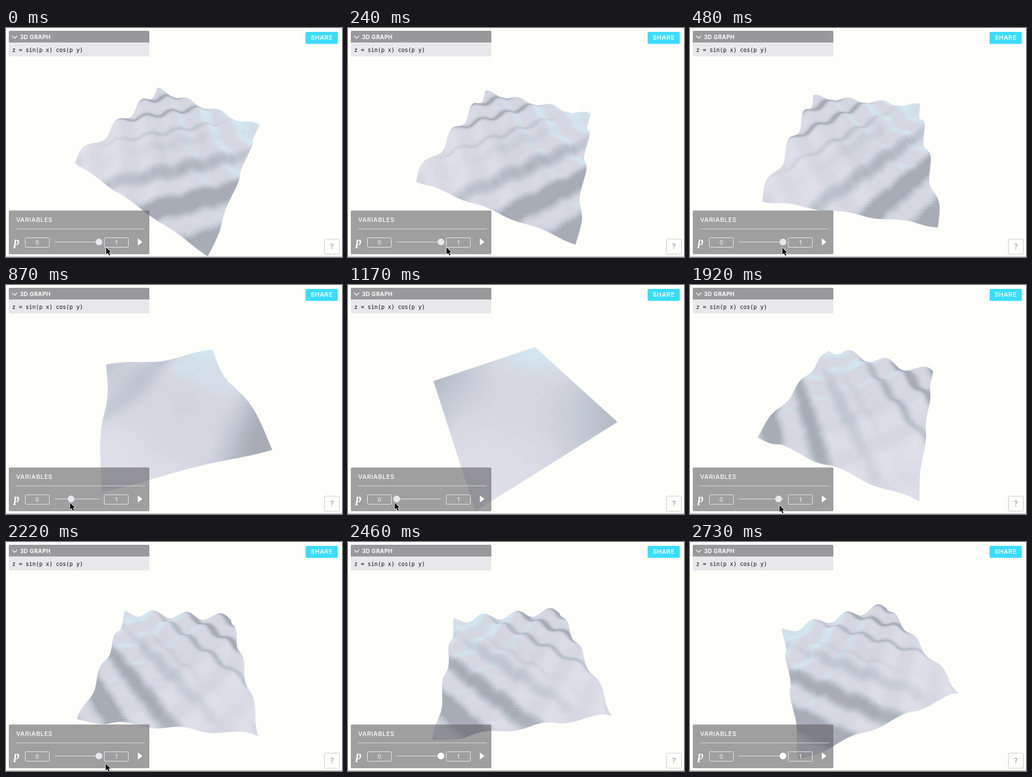
Recreate the animation shown at these times as an HTML page with a canvas. Size 600 by 411 pixels, loop 2.76 s.

```html
<!DOCTYPE html>
<html lang="en">
<head>
<meta charset="utf-8">
<title>3D graph</title>
<style>
  html, body { margin: 0; width: 100%; height: 100%; overflow: hidden; background: #fefefb; }
  canvas { display: block; width: 600px; height: 411px; }
</style>
</head>
<body>
<canvas id="stage" width="600" height="411"></canvas>
<script>
const W = 600, H = 411, LOOP = 2760, STEP = 30;
const canvas = document.getElementById('stage');
const dpr = window.devicePixelRatio || 1;
canvas.width = W * dpr;
canvas.height = H * dpr;
const ctx = canvas.getContext('2d');
ctx.scale(dpr, dpr);

const BACK = '#fefefb', PALE = '#e8e8ea', WHITE = '#fdfdfd';
const SANS = 'Inter, Roboto, sans-serif';
const clamp = (v, a, b) => Math.min(b, Math.max(a, v));
const ramp = (a, b, v) => clamp((v - a) / (b - a), 0, 1);
const mix = (a, b, k) => a.map((v, i) => v + (b[i] - v) * k);

// Pointer path: time, x, y
const PATH = [
  [0, 179, 394], [240, 176, 394], [480, 165, 394.5], [870, 114.5, 391],
  [1230, 82.7, 391], [1650, 126, 394], [1980, 166, 396],
  [2220, 178, 398], [2460, 182, 418]
];
// Turn of the surface: time, degrees
const TURN = [[0, 58.4], [480, 82.2], [2220, 175.6], [2730, 201.2]];

function slope(keys, i, c) {
  const a = keys[Math.max(i - 1, 0)], b = keys[Math.min(i + 1, keys.length - 1)];
  return (b[c] - a[c]) / (b[0] - a[0]);
}

// Smooth curve through the keys
function track(keys, t, c) {
  const last = keys.length - 1;
  if (t <= 0) return keys[0][c];
  if (t >= keys[last][0]) return keys[last][c];
  const i = keys.findIndex(k => k[0] > t) - 1;
  const a = keys[i], b = keys[i + 1], h = b[0] - a[0], s = (t - a[0]) / h;
  const s2 = s * s, s3 = s2 * s;
  return (2 * s3 - 3 * s2 + 1) * a[c] + (3 * s2 - 2 * s3) * b[c]
    + h * ((s3 - 2 * s2 + s) * slope(keys, i, c) + (s3 - s2) * slope(keys, i + 1, c));
}

// Surface z = sin(p x) cos(p y) over [-10, 10]^2
const R = 10, N = 72, UNIT = 11.915, FOCAL = 276;
const SIN_E = 0.787, COS_E = 0.617;
const DARK = [167, 171, 181], MID = [189, 197, 208], LIGHT = [212, 214, 225];
const WARM = [225, 226, 236], COOL = [210, 238, 246];
const LIGHT_H = 14, LIGHT_MAX = 1 / LIGHT_H, LIGHT_MID = 0.0707;

function lamp(lx, ly, x, y, z, nx, ny, soft) {
  const dx = lx - x, dy = ly - y, dz = LIGHT_H - z;
  const facing = nx * dx + ny * dy + dz;
  return Math.max(0, facing) / (dx * dx + dy * dy + dz * dz) / soft;
}

function shade(x, y, p) {
  const sx = Math.sin(p * x), cx = Math.cos(p * x);
  const sy = Math.sin(p * y), cy = Math.cos(p * y);
  const nx = -p * cx * cy, ny = p * sx * sy;
  const soft = Math.pow(1 + nx * nx + ny * ny, 0.25);
  const cool = lamp(R, -R, x, y, sx * cy, nx, ny, soft);
  const warm = lamp(-R, R, x, y, sx * cy, nx, ny, soft);
  const level = (cool + warm) / LIGHT_MID;
  let col = mix(mix(DARK, MID, ramp(0.55, 0.77, level)), LIGHT, ramp(0.77, 0.98, level));
  col = mix(col, WARM, ramp(0.6, 1.15, warm / LIGHT_MAX));
  col = mix(col, COOL, ramp(0.65, 1.15, cool / LIGHT_MAX));
  return `rgb(${col.map(Math.round).join()})`;
}

function drawSurface(angle, p) {
  const ca = Math.cos(angle), sa = Math.sin(angle), cell = 2 * R / N;
  const at = i => -R + i * cell;
  const pts = [];
  for (let i = 0; i <= N; i++) {
    for (let j = 0; j <= N; j++) {
      const x = at(i), y = at(j);
      const u = (x * ca - y * sa) * UNIT, v = (x * sa + y * ca) * UNIT;
      const z = Math.sin(p * x) * Math.cos(p * y) * UNIT;
      const w = 1 + (v * COS_E - z * SIN_E) / FOCAL;
      pts.push([300 + u / w, 205.5 - (v * SIN_E + z * COS_E) / w]);
    }
  }
  ctx.lineWidth = 0.7;
  ctx.lineJoin = 'round';
  // Far cells first
  for (let a = 0; a < N; a++) {
    const i = sa > 0 ? N - 1 - a : a;
    for (let b = 0; b < N; b++) {
      const j = ca > 0 ? N - 1 - b : b;
      const k = i * (N + 1) + j;
      ctx.beginPath();
      for (const n of [k, k + 1, k + N + 2, k + N + 1]) ctx.lineTo(pts[n][0], pts[n][1]);
      ctx.closePath();
      ctx.fillStyle = ctx.strokeStyle = shade(at(i + 0.5), at(j + 0.5), p);
      ctx.fill();
      ctx.stroke();
    }
  }
}

function rect(x, y, w, h, color, r = 0) {
  ctx.beginPath();
  ctx.roundRect(x, y, w, h, r);
  ctx.fillStyle = color;
  ctx.fill();
}

function frame(x, y, w, h, color, r) {
  ctx.beginPath();
  ctx.roundRect(x, y, w, h, r);
  ctx.strokeStyle = color;
  ctx.lineWidth = 1;
  ctx.stroke();
}

function text(str, x, y, font, color, align = 'left', gap = 0) {
  ctx.font = font;
  ctx.fillStyle = color;
  ctx.textAlign = align;
  ctx.letterSpacing = gap + 'px';
  ctx.fillText(str, x, y);
}

function poly(points, fill, stroke, width = 1, close = true) {
  ctx.beginPath();
  for (const [x, y] of points) ctx.lineTo(x, y);
  if (close) ctx.closePath();
  if (stroke) { ctx.strokeStyle = stroke; ctx.lineWidth = width; ctx.stroke(); }
  if (fill) { ctx.fillStyle = fill; ctx.fill(); }
}

function drawHeader() {
  rect(5, 5, 251, 21, '#99999b', [2, 2, 0, 0]);
  rect(5, 26, 251, 25, PALE, [0, 0, 2, 2]);
  poly([[11, 14], [15.5, 18.5], [20, 14]], null, WHITE, 1.2, false);
  text('3D GRAPH', 25, 19.5, `700 10px ${SANS}`, WHITE, 'left', 0.4);
  text('z = sin(p x) cos(p y)', 11, 43, '10px "DejaVu Sans Mono", monospace', '#101010');
}

function drawButtons() {
  rect(535, 7, 57.5, 21.5, '#3cdcfc', 2);
  text('SHARE', 544, 21, `600 11px ${SANS}`, WHITE, 'left', 0.4);
  rect(568, 378.5, 28, 28, BACK, 2);
  frame(568.5, 379, 27, 27, '#cdcdcd', 2);
  text('?', 582, 397, `500 13px ${SANS}`, '#a4a4a4', 'center');
}

function drawPanel(knob, idle) {
  rect(5, 327.5, 251, 78.5, 'rgba(98,98,100,0.6)', 2);
  text('VARIABLES', 18, 347.5, `500 11px ${SANS}`, WHITE, 'left', 0.6);
  rect(18, 360, 230, 1, 'rgba(232,232,236,0.75)');
  text('p', 14, 390, 'italic 700 20px "Liberation Serif", serif', WHITE);
  frame(34.5, 376.5, 43, 17, PALE, 2);
  text('0', 56, 388.5, `10px ${SANS}`, WHITE, 'center');
  frame(175.5, 376.5, 43, 17, PALE, 2);
  text('1', 197, 388.5, `10px ${SANS}`, WHITE, 'center');
  rect(87, 383.5, 79, 1, PALE);
  ctx.beginPath();
  ctx.arc(knob, 384, 6, 0, 7);
  ctx.fillStyle = idle ? '#fff' : PALE;
  ctx.fill();
  poly([[235.5, 377.5], [243.5, 384], [235.5, 390.5]], WHITE);
}

function drawPointer(x, y) {
  const arrow = [[0, 0], [0, 12], [2.8, 9.4], [5, 14.2], [7, 13.3], [4.9, 8.7], [8.6, 8.6]];
  poly(arrow.map(([a, b]) => [x + a, y + b]), '#000', '#fff', 1.5);
}

function draw(t) {
  const knob = clamp(track(PATH, t - 15, 1), 87, 166);
  rect(0, 0, W, H, BACK);
  drawSurface(track(TURN, t, 1) * Math.PI / 180, (knob - 87) / 79);
  rect(0, 410, W, 1, '#adada8');
  drawHeader();
  drawButtons();
  drawPanel(knob, t >= 2340);
  drawPointer(track(PATH, t, 1), track(PATH, t, 2));
}

const start = performance.now();
let shown = -1;
function tick() {
  const t = Math.floor(((performance.now() - start) % LOOP) / STEP) * STEP;
  if (t !== shown) draw(shown = t);
  requestAnimationFrame(tick);
}
tick();
</script>
</body>
</html>
```
